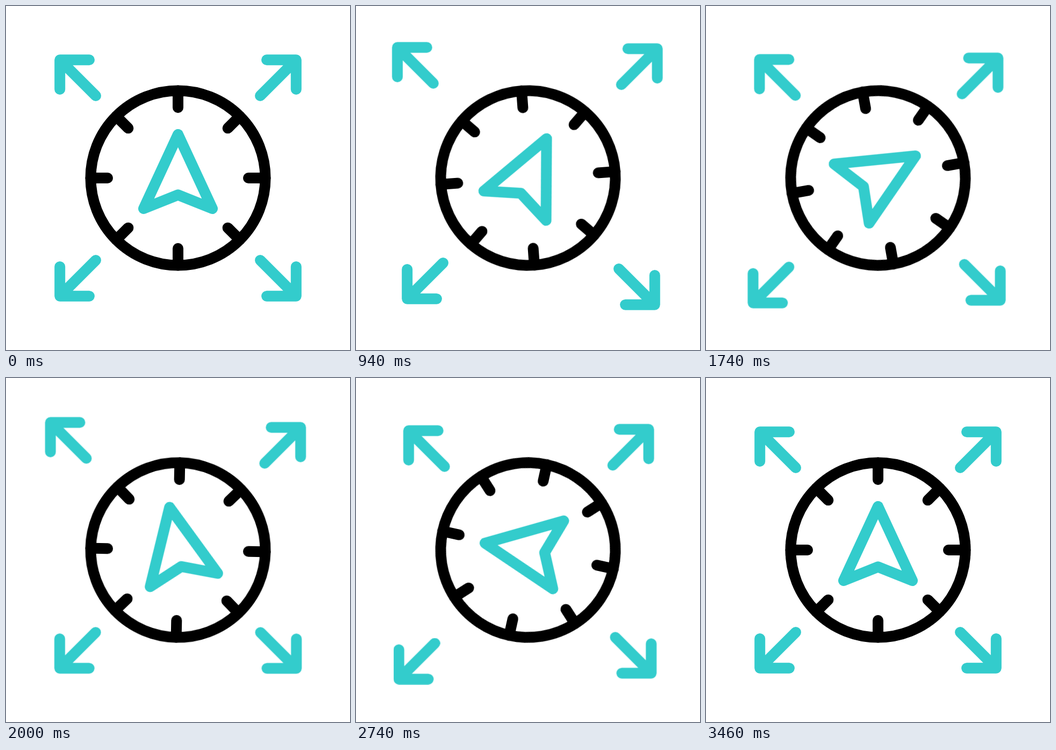
An HTML page that plays this animation: 640 by 640 pixels, repeating every 3.6 s.

```html
<!DOCTYPE html>
<html lang="en">
<head>
<meta charset="utf-8">
<title>Compass</title>
<style>
  html, body { margin: 0; width: 100%; height: 100%; overflow: hidden; background: #fff; }
  svg { display: block; width: 100%; height: 100%; }
  g, path, circle { fill: none; stroke-width: 20; stroke-linecap: round; stroke-linejoin: round; }
  #dial { stroke: #000; }
  #needle, #arrows { stroke: #33cccc; }
  #dial, #needle { transform-origin: 320px 320px; }
</style>
</head>
<body>
<svg viewBox="0 0 640 640">
  <g id="dial"><circle cx="320" cy="320" r="162.5"/></g>
  <path id="needle" d="M320 239 L256 377 L320 351.4 L384 377 Z"/>
  <g id="arrows"></g>
</svg>
<script>
const LOOP = 3600;
const SOFT = 'cubic-bezier(.333,0,.667,1)';
const SNAP = 'cubic-bezier(.333,0,0,1)';
const byId = id => document.getElementById(id);

function add(parent, tag, attrs = {}) {
  const el = document.createElementNS('http://www.w3.org/2000/svg', tag);
  for (const name in attrs) el.setAttribute(name, attrs[name]);
  return parent.appendChild(el);
}

// steps: [time in ms, value, easing towards the next step]
function play(el, steps, toTransform) {
  const all = [[0, 0], ...steps, [LOOP, 0]];
  el.animate(
    all.map(([time, value, easing = 'linear']) =>
      ({ offset: time / LOOP, transform: toTransform(value), easing })),
    { duration: LOOP, iterations: Infinity }
  );
}

// Dial and needle swing in opposite directions
const swing = (el, first, second) => play(el, [
  [600, 0, 'cubic-bezier(.6,0,.42,1)'],
  [1455, first, 'cubic-bezier(.333,0,.6,1)'],
  [2515, second, SOFT],
  [3463, 0]
], v => `rotate(${v}deg)`);

for (let a = 0; a < 360; a += 45) {
  add(byId('dial'), 'path', { d: 'M320 157.5 V189', transform: `rotate(${a} 320 320)` });
}
swing(byId('dial'), -16, 14.5);
swing(byId('needle'), 96.2, -94.5);

// Corner arrows, clockwise from top left, each pulsing 80 ms after the last
[[1, 1], [-1, 1], [-1, -1], [1, -1]].forEach(([sx, sy], i) => {
  const corner = add(byId('arrows'), 'g', {
    transform: `translate(320 320) scale(${sx} ${sy}) translate(-320 -320)`
  });
  const arrow = add(corner, 'path', { d: 'M155 100.2 H100.2 V155 M100.2 100.2 L167 167' });
  const start = 600 + i * 80;
  const out = -25.5;
  play(arrow, [
    [start, 0, SNAP],
    [start + 600, out, SOFT],
    [start + 1200, 0, SNAP],
    [start + 1800, out, SNAP],
    [start + 2400, 0]
  ], v => `translate(${v}px, ${v}px)`);
});
</script>
</body>
</html>
```
